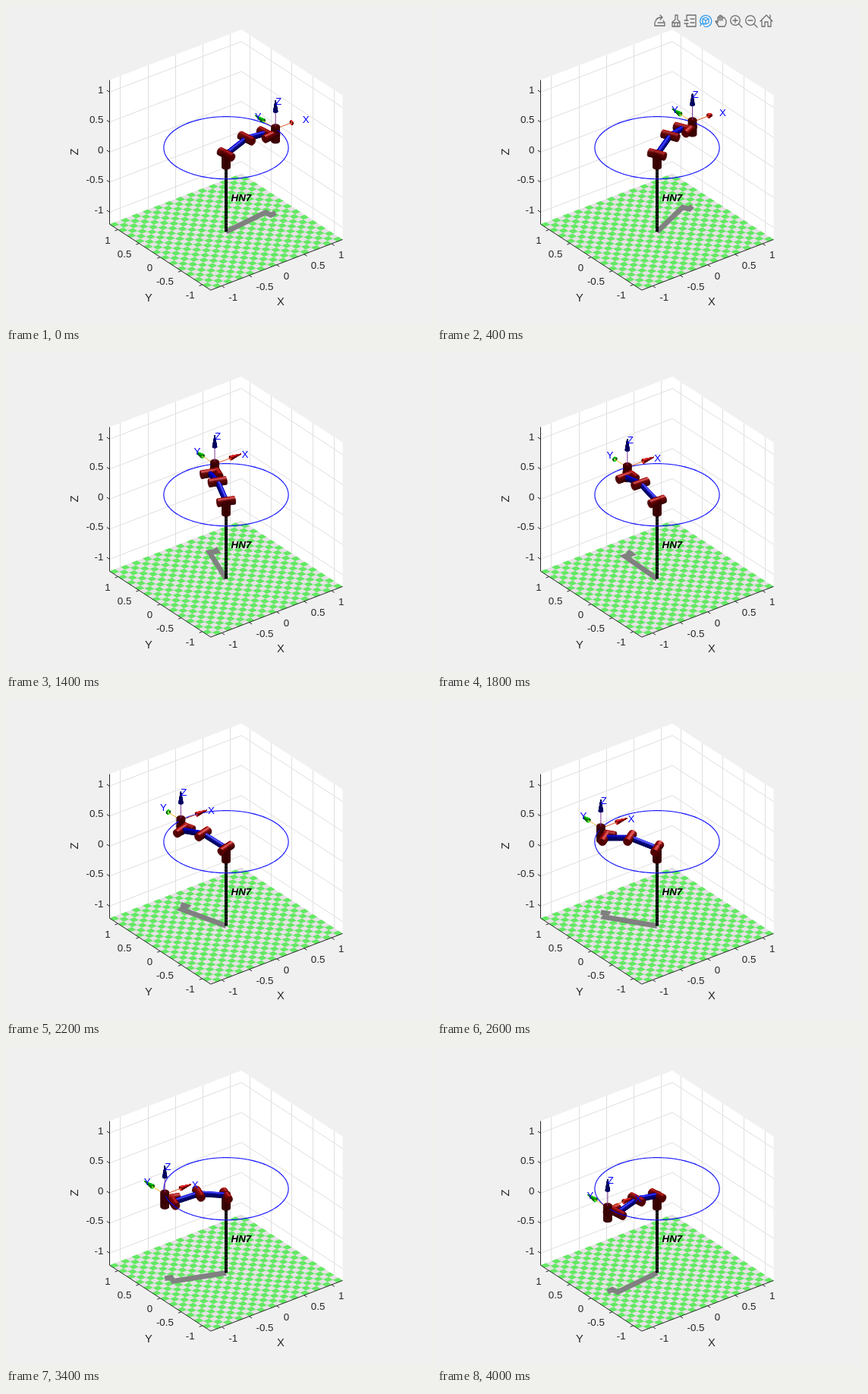
Recreate the animation shown at these times as an HTML page with a canvas. Size 560x420 px, loop 4200 ms.

```html
<!DOCTYPE html>
<html lang="en">
<head>
<meta charset="utf-8">
<title>Robot arm on a circular path</title>
<style>
  html, body { margin: 0; width: 560px; height: 420px; overflow: hidden; background: #f0f0f0; }
  canvas, svg { position: absolute; left: 0; top: 0; display: block; }
  text { font: 13.33px "Liberation Sans", Arial, sans-serif; }
  #ticks text, #names text { fill: #262626; }
  #names text { font-size: 14.67px; text-anchor: middle; }
  #tags text { fill: #00f; text-anchor: middle; }
  #robot { font-weight: bold; font-style: italic; }
  #tools { fill: none; stroke: #6e6e6e; stroke-width: 1.3; stroke-linejoin: round; stroke-linecap: round; visibility: hidden; }
  #tools .on { stroke: #2f9df0; }
</style>
</head>
<body>
<canvas id="stage" width="560" height="420"></canvas>
<svg width="560" height="420" viewBox="0 0 560 420">
  <g id="ticks"></g>
  <g id="names">
    <text x="362" y="394">X</text>
    <text x="188" y="389">Y</text>
    <text transform="translate(94.5 192) rotate(-90)">Z</text>
  </g>
  <text id="robot" x="296.5" y="257">HN7</text>
  <g id="tags">
    <text x="40" y="-8">X</text>
    <text x="-23" y="-12">Y</text>
    <text x="4" y="-32">Z</text>
  </g>
  <g id="tools">
    <path d="M287 21v5h13v-3M288 20c1-4 4-5 8-5M294 12l3 3-3 3M291 22h9l-2-3"/>
    <path d="M314 12h3v6l3 3v6h-10v-6l4-3zM310 22h10M313 23v4M317 23v4"/>
    <path d="M329 12h12v15h-12v-4M329 19v-7M326 19h5M326 23h5M334 17h5M334 22h5"/>
    <g class="on">
      <path d="M348 24a7.5 7.5 0 1 1 4 3M347 26l2-3 3 2"/>
      <path d="M354 15l4 2v5l-4 2-4-2v-5zM350 17l4 2 4-2M354 19v5"/>
    </g>
    <path d="M371 27c-1-3-3-4-4-7 1-1 2 0 3 2v-7c1-1 2-1 2 0v4-6c1-1 2-1 2 0v6-5c1-1 2-1 2 0v5-3c1-1 3-1 3 0l2 3v4l-2 4z"/>
    <path d="M398 24l4 4M390 19h6M393 16v6"/><circle cx="393" cy="19" r="6.3"/>
    <path d="M418 24l4 4M410 19h6"/><circle cx="413" cy="19" r="6.3"/>
    <path d="M426 20l8-8 8 8M428 19v8h4v-6h4v6h4v-8M439 16v-4"/>
  </g>
</svg>
<script>
const ctx = document.getElementById('stage').getContext('2d');
const byId = id => document.getElementById(id);
const STEP = 200, STEPS = 21, LIM = 1.2, UNIT = 91.25;
const AZ = 37.5 * Math.PI / 180;
const cosAz = Math.cos(AZ), sinAz = Math.sin(AZ), cosEl = Math.sqrt(0.75);
const UP = [0, 0, 1], EYE = [-sinAz * cosEl, -cosAz * cosEl, 0.5];
const MARKS = [-1, -0.5, 0, 0.5, 1];

const dot = (a, b) => a[0] * b[0] + a[1] * b[1] + a[2] * b[2];
const add = (p, v, k = 1) => p.map((c, i) => c + v[i] * k);
const sub = (a, b) => add(a, b, -1);
const unit = v => v.map(c => c / Math.hypot(...v));
const cross = (a, b) => [a[1] * b[2] - a[2] * b[1], a[2] * b[0] - a[0] * b[2], a[0] * b[1] - a[1] * b[0]];
const project = ([x, y, z]) => [
  290 + UNIT * (cosAz * x - sinAz * y),
  202.5 - UNIT * (0.5 * (sinAz * x + cosAz * y) + cosEl * z)
];

const LIGHTS = [UP, unit([1, 0.5, 1])];
const RED = [178, 0, 0], BLUE = [0, 0, 255];

function trace(points) {
  ctx.beginPath();
  for (const p of points) ctx.lineTo(...project(p));
}
function polygon(points, color, seam) {
  trace(points);
  ctx.closePath();
  ctx.fillStyle = color;
  ctx.fill();
  if (seam) {
    ctx.strokeStyle = color;
    ctx.lineWidth = 0.6;
    ctx.stroke();
  }
}
function polyline(points, color, width) {
  trace(points);
  ctx.strokeStyle = color;
  ctx.lineWidth = width;
  ctx.stroke();
}
// Vertical hairline on whole pixels
function upright(x, y, color) {
  const [px, low] = project([x, y, -LIM]);
  const top = project([x, y, LIM])[1];
  ctx.fillStyle = color;
  ctx.fillRect(Math.floor(px), top, 1, low - top);
}

// Back-to-front queue of small pieces
let queue = [];
function push(points, draw) {
  const depth = points.reduce((s, p) => s + dot(p, EYE), 0) / points.length;
  queue.push({ depth, draw });
}
function flush() {
  queue.sort((a, b) => a.depth - b.depth).forEach(q => q.draw());
  queue = [];
}

function shade(normal, rgb) {
  let diffuse = 0.32, gloss = 0;
  for (const l of LIGHTS) {
    const d = dot(normal, l);
    if (d <= 0) continue;
    diffuse += 0.3 * d;
    const mirror = sub(normal.map(c => 2 * d * c), l);
    gloss += 0.4 * Math.max(0, dot(mirror, EYE)) ** 10;
  }
  return `rgb(${rgb.map(c => Math.min(255, Math.round(c * diffuse + 255 * gloss)))})`;
}

// Frustum around an axis, from t0 to t1
function solid(p, axis, t0, t1, r0, r1, rgb, closed, rows) {
  const SIDES = 24;
  const b = unit(cross(axis, Math.abs(axis[2]) > 0.9 ? [1, 0, 0] : UP));
  const c = cross(axis, b);
  const radial = i => {
    const a = i * 2 * Math.PI / SIDES;
    return add(b.map(v => v * Math.cos(a)), c, Math.sin(a));
  };
  const at = (i, f) => add(add(p, axis, t0 + (t1 - t0) * f), radial(i), r0 + (r1 - r0) * f);
  for (let i = 0; i < SIDES; i++) {
    let n = unit(add(radial(i + 0.5).map(v => v * (t1 - t0)), axis, r0 - r1));
    if (dot(n, EYE) < 0) {
      if (closed) continue;
      n = n.map(v => -v);
    }
    const color = shade(n, rgb);
    for (let k = 0; k < rows; k++) {
      const f = k / rows, g = (k + 1) / rows;
      const quad = [at(i, f), at(i + 1, f), at(i + 1, g), at(i, g)];
      push(quad, () => polygon(quad, color, true));
    }
  }
  if (!closed) return;
  const end = dot(axis, EYE) > 0 ? 1 : 0;
  const cap = Array.from({ length: SIDES }, (_, i) => at(i, end));
  const capColor = `rgb(${rgb.map(v => Math.round(v * 0.45))})`;
  push(cap, () => polygon(cap, capColor, true));
}
const joint = (p, axis) => solid(p, axis, -0.128, 0.128, 0.058, 0.058, RED, true, 8);
function link(p, q) {
  const v = sub(q, p);
  solid(p, unit(v), 0, Math.hypot(...v), 0.037, 0.037, BLUE, true, 12);
}
function line(p, q, color, width, parts) {
  const v = sub(q, p);
  for (let k = 0; k < parts; k++) {
    const seg = [add(p, v, k / parts), add(p, v, (k + 1) / parts)];
    push(seg, () => polyline(seg, color, width));
  }
}

// Axis arrow, cut off at the edge of the plot box
function arrow(p, i, lineColor, rgb) {
  const HEAD = 0.285, TIP = 0.475, R = 0.031;
  const axis = [0, 1, 2].map(k => +(k === i));
  const end = Math.min(TIP, LIM - p[i]);
  line(p, add(p, axis, Math.min(end, 0.3)), lineColor, 1, 8);
  if (end > HEAD) {
    solid(p, axis, HEAD, end, R, R * (TIP - end) / (TIP - HEAD), rgb, false, 4);
  }
}

function backdrop() {
  const L = LIM, GRID = '#dfdfdf', INK = '#262626';
  ctx.fillStyle = '#f0f0f0';
  ctx.fillRect(0, 0, 560, 420);
  polygon([[-L, L, -L], [-L, L, L], [L, L, L], [L, -L, L], [L, -L, -L], [-L, -L, -L]], '#fff');
  for (const m of MARKS) {
    upright(m, L, GRID);
    upright(L, m, GRID);
    polyline([[-L, L, m], [L, L, m], [L, -L, m]], GRID, 1);
  }
  polygon([[-L, -L, -L], [L, -L, -L], [L, L, -L], [-L, L, -L]], '#e6e1e5');
  const S = 0.1;
  for (let i = 0; i < 24; i++) {
    for (let j = (i + 1) % 2; j < 24; j += 2) {
      const x = -L + i * S, y = -L + j * S;
      polygon([[x, y, -L], [x + S, y, -L], [x + S, y + S, -L], [x, y + S, -L]], '#63e963');
    }
  }
  upright(-L, L, INK);
  polyline([[-L, L, -L], [-L, -L, -L], [L, -L, -L]], INK, 1);
  for (const m of MARKS) {
    polyline([[m, -L, -L], [m, -L - 0.065, -L]], INK, 1);
    polyline([[-L, m, -L], [-L - 0.055, m, -L]], INK, 1);
    polyline([[-L, L, m], [-L, L + 0.065, m]], INK, 1);
  }
}

// Joint positions for a tool that stays upright on the circle
const D1 = 0.089159, A2 = 0.425, A3 = 0.39225, D4 = 0.10915, D5 = 0.09465, D6 = 0.0823;
const RADIUS = 0.9, HEIGHT = 0.2;
const onCircle = a => [RADIUS * Math.cos(a), RADIUS * Math.sin(a), HEIGHT];

function pose(angle) {
  const yaw = angle + Math.asin(D4 / RADIUS);
  const out = [Math.cos(yaw), Math.sin(yaw), 0];
  const side = [Math.sin(yaw), -Math.cos(yaw), 0];
  const reach = Math.sqrt(RADIUS ** 2 - D4 ** 2) - D5;
  const rise = HEIGHT - D6 - D1;
  const span = Math.hypot(reach, rise);
  const k = (span ** 2 + A2 ** 2 - A3 ** 2) / (2 * span);
  const h = Math.sqrt(A2 ** 2 - k ** 2);
  const shoulder = [0, 0, D1];
  const inPlane = (r, z) => add(add(shoulder, out, r), UP, z);
  const elbow = inPlane((reach * k - rise * h) / span, (rise * k + reach * h) / span);
  const wrist1 = inPlane(reach, rise);
  const wrist2 = add(wrist1, side, D4);
  const wrist3 = add(wrist2, out, D5);
  return { out, side, shoulder, elbow, wrist1, wrist2, wrist3, tip: onCircle(angle) };
}

function draw(step) {
  const a = pose(step * Math.PI / 20);
  backdrop();

  const floor = ([x, y]) => [x, y, -LIM];
  polyline([a.shoulder, a.wrist1, a.wrist2, a.wrist3].map(floor), '#808080', 6.7);

  line([0, 0, -LIM], [0, 0, 0], '#000', 4, 24);
  for (let i = 0; i < 120; i++) {
    line(onCircle(i * Math.PI / 60), onCircle((i + 1) * Math.PI / 60), '#00f', 1.1, 1);
  }
  joint([0, 0, 0], UP);
  for (const p of [a.shoulder, a.elbow, a.wrist1]) joint(p, a.side);
  joint(a.wrist2, a.out);
  joint(a.wrist3, UP);
  link(a.shoulder, a.elbow);
  link(a.elbow, a.wrist1);
  arrow(a.tip, 0, '#d95319', [255, 0, 0]);
  arrow(a.tip, 1, '#edb120', [0, 255, 0]);
  arrow(a.tip, 2, '#7e2f8e', BLUE);
  flush();

  byId('tags').setAttribute('transform', `translate(${project(a.tip)})`);
  byId('tools').style.visibility = step === 1 || step === 2 ? 'visible' : 'hidden';
}

function tick(value, point, dx, dy, anchor) {
  const [x, y] = project(point);
  const t = document.createElementNS('http://www.w3.org/2000/svg', 'text');
  t.textContent = value;
  t.setAttribute('x', x + dx);
  t.setAttribute('y', y + dy + 4.8);
  t.setAttribute('text-anchor', anchor);
  byId('ticks').append(t);
}
for (const m of MARKS) {
  tick(m, [m, -LIM, -LIM], 9, 14.7, 'start');
  tick(m, [-LIM, m, -LIM], -10, 13.7, 'end');
  tick(m, [-LIM, LIM, m], -8, -3.3, 'end');
}

const start = performance.now();
let shown = -1;
function loop() {
  const step = Math.floor((performance.now() - start) / STEP) % STEPS;
  if (step !== shown) draw(shown = step);
  requestAnimationFrame(loop);
}
loop();
</script>
</body>
</html>
```
